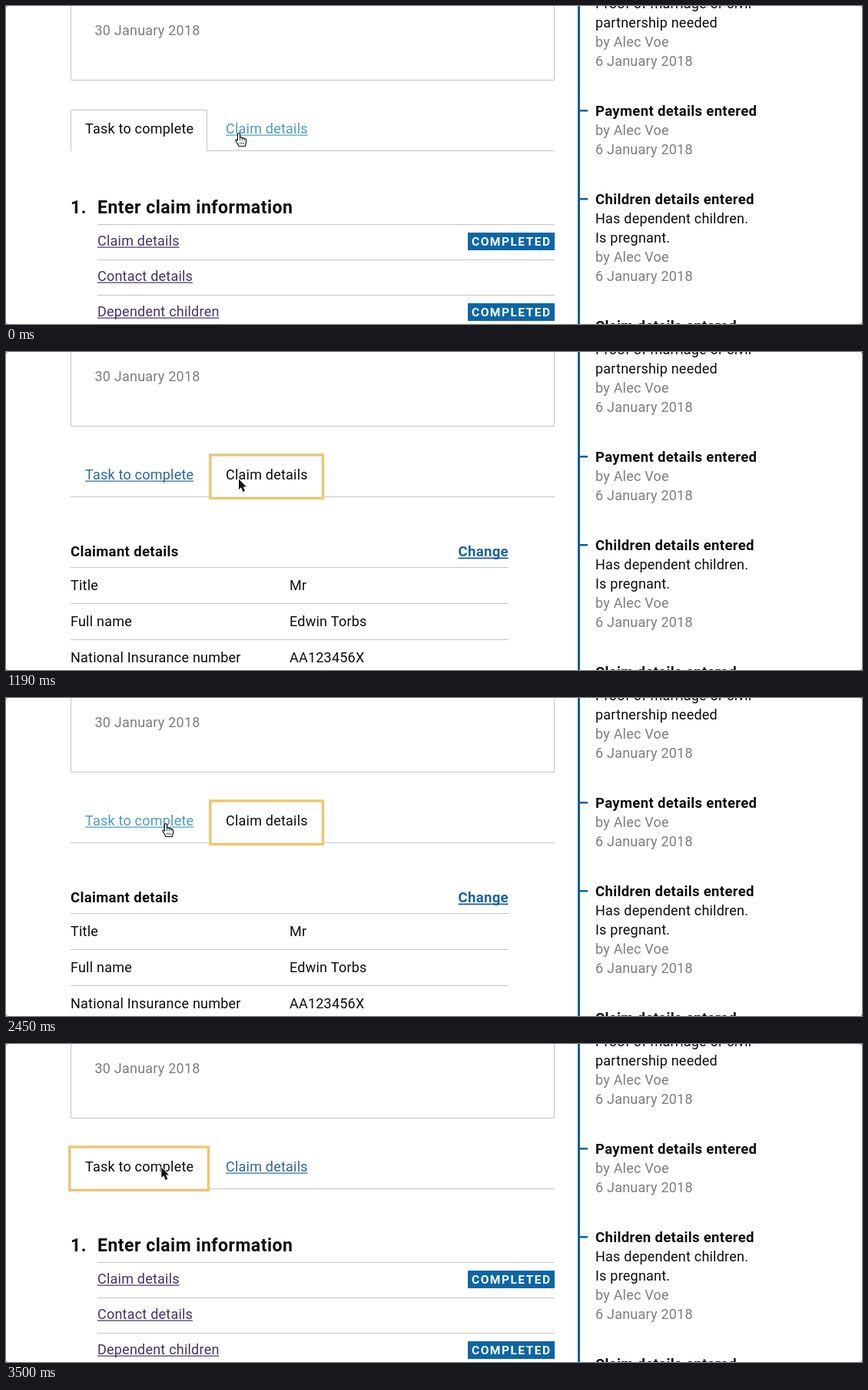
Recreate the animation shown at these times as an HTML page with a canvas. Size 1114 by 414 pixels, loop 3.57 s.

```html
<!DOCTYPE html>
<html lang="en">
<head>
<meta charset="utf-8">
<title>Claim tabs</title>
<style>
html, body { margin: 0; width: 100%; height: 100%; overflow: hidden; background: #fff; }
canvas { display: block; width: 1114px; height: 414px; }
</style>
</head>
<body>
<canvas id="stage"></canvas>
<script>
const W = 1114, H = 414, LOOP = 3570, STEP = 70;
const canvas = document.getElementById('stage');
const ctx = canvas.getContext('2d');
const dpr = window.devicePixelRatio || 1;
canvas.width = W * dpr;
canvas.height = H * dpr;

const INK = '#0b0c0c', GREY = '#7c7d7e', RULE = '#c4c5c6', FOCUS = '#ecc672';
const BLUE = '#0c66a6', LINK = '#2a6695', HOVER = '#4b9ac4', VISITED = '#44316b';

const STYLES = {
  body: ['400 18px', 0.22],
  bold: ['700 18.5px', 0.35],
  head: ['700 23px', 0.5],
  tag: ['700 15.5px', 1.5]
};

function text(str, x, y, color = INK, style = 'body') {
  const [font, spacing] = STYLES[style];
  ctx.font = font + ' Roboto, sans-serif';
  ctx.letterSpacing = spacing + 'px';
  ctx.fillStyle = color;
  ctx.fillText(str, x, y);
  return ctx.measureText(str).width - spacing;
}

function link(str, x, y, color, style) {
  const w = text(str, x, y, color, style);
  ctx.fillRect(x, y + 1.5, w, style === 'bold' ? 1.8 : 1.2);
}

function rule(x1, x2, y) {
  ctx.fillStyle = RULE;
  ctx.fillRect(x1, y, x2 - x1, 1);
}

function outline(points, color, width) {
  ctx.beginPath();
  points.forEach(([x, y]) => ctx.lineTo(x, y));
  ctx.strokeStyle = color;
  ctx.lineWidth = width;
  ctx.stroke();
}

function drawSummary() {
  outline([[84.5, -2], [84.5, 96.5], [713.5, 96.5], [713.5, -2]], RULE, 1);
  text('30 January 2018', 115.5, 38, GREY);
}

function drawTimeline() {
  ctx.fillStyle = '#0d5f99';
  ctx.fillRect(744, 0, 3, H);
  for (const y of [135, 250]) ctx.fillRect(747, y, 10, 2.5);

  const x = 767;
  const stamp = y => {
    text('by Alec Voe', x, y, GREY);
    text('6 January 2018', x, y + 25, GREY);
  };
  text('Proof of marriage or civil', x, 3);
  text('partnership needed', x, 28);
  stamp(53);
  text('Payment details entered', x, 143, INK, 'bold');
  stamp(168);
  text('Children details entered', x, 258, INK, 'bold');
  text('Has dependent children.', x, 283);
  text('Is pregnant.', x, 308);
  stamp(333);
  text('Claim details entered', x, 423, INK, 'bold');
}

const TABS = [
  { label: 'Task to complete', x: 103, left: 84.5, right: 261.5 },
  { label: 'Claim details', x: 286, left: 267.5, right: 410.5 }
];

function drawTabs({ selected, focused, hovered }) {
  const open = TABS[selected];
  rule(84, open.left, 188);
  rule(open.right, 714, 188);
  if (selected !== focused) {
    const { left, right } = open;
    outline([[left, 189], [left, 135.5], [right, 135.5], [right, 189]], RULE, 1);
  }
  TABS.forEach((tab, i) => {
    if (i === focused) {
      const inset = i === selected ? 0 : 5.5;
      ctx.strokeStyle = FOCUS;
      ctx.lineWidth = 3.4;
      ctx.strokeRect(tab.left - 1.7, 134 + inset, tab.right - tab.left + 3.6, 56.3 - 2 * inset);
    }
    if (i === selected) text(tab.label, tab.x, 166);
    else link(tab.label, tab.x, 166, i === hovered ? HOVER : LINK);
  });
}

function drawTasks() {
  text('1.', 84, 270, INK, 'head');
  text('Enter claim information', 119, 270, INK, 'head');
  ['Claim details', 'Contact details', 'Dependent children'].forEach((name, i) => {
    const y = 284 + 46 * i;
    rule(119, 714, y);
    link(name, 119, y + 28, VISITED);
    if (i === 1) return;
    ctx.fillStyle = BLUE;
    ctx.fillRect(601, y + 11, 113, 23);
    text('COMPLETED', 606, y + 28, '#fff', 'tag');
  });
}

function drawClaim() {
  text('Claimant details', 84, 266, INK, 'bold');
  link('Change', 588.5, 266, '#15629a', 'bold');
  const rows = [
    ['Title', 'Mr'],
    ['Full name', 'Edwin Torbs'],
    ['National Insurance number', 'AA123456X']
  ];
  rows.forEach(([name, value], i) => {
    const y = 280 + 47 * i;
    rule(84, 654, y);
    text(name, 84, y + 30);
    text(value, 369, y + 30);
  });
}

const ARROW = new Path2D('M0 0V13.5L3 10.8 5.3 16.4 8 15.2 5.7 9.9H9.8Z');
const HAND = new Path2D('M-1.6 1.4C-1.6-.4 1.4-.4 1.5 1.4V6C1.8 4.9 4.2 5 4.3 6.6 5 5.6 7 5.9 7 7.5 ' +
  '8 6.7 9.5 7.2 9.5 8.6V12C9.5 14 8.3 15 8.3 17H-.1C-.3 15-2 13.6-3.6 11 ' +
  '-5.2 8.6-3.2 7.7-1.6 9.6Z');
const FINGERS = new Path2D('M1.5 6V9.5M4.3 6.6V9.8M7 7.5V10M1.7 12V14.6M4 12V14.6M6.2 12V14.6');

function drawPointer({ x, y, hand }) {
  ctx.save();
  ctx.translate(x, y);
  ctx.lineJoin = 'round';
  ctx.lineWidth = hand ? 1.2 : 1.6;
  ctx.strokeStyle = hand ? '#111' : '#fff';
  ctx.fillStyle = hand ? '#fff' : '#111';
  if (hand) {
    ctx.fill(HAND);
    ctx.stroke(HAND);
    ctx.lineWidth = 0.8;
    ctx.stroke(FINGERS);
  } else {
    ctx.stroke(ARROW);
    ctx.fill(ARROW);
  }
  ctx.restore();
}

function drawPress(x, y) {
  ctx.beginPath();
  ctx.arc(x, y, 30.5, 0, Math.PI * 2);
  ctx.strokeStyle = '#111';
  ctx.lineWidth = 1.4;
  ctx.stroke();
}

function drawCorners() {
  const r = 3;
  ctx.beginPath();
  ctx.rect(0, 0, W, H);
  ctx.roundRect(0, 0, W, H, r);
  ctx.fillStyle = '#777';
  ctx.fill('evenodd');
}

const mix = (a, b, k) => a + (b - a) * k;
const ease = (t, start, end) => {
  const k = Math.min(1, Math.max(0, (t - start) / (end - start)));
  return k * k * (3 - 2 * k);
};

const PRESS_1 = 1050, OPEN_CLAIM = 1190, PRESS_2 = 3220, OPEN_TASKS = 3360;

function stateAt(t) {
  const across = ease(t, 1960, 2380);
  const settle = ease(t, 2800, 3080);
  const x = mix(303, 208, across) - 5.7 * settle;
  const y = mix(165.5, 163.5, across) - 1.5 * settle;
  const selected = t >= OPEN_CLAIM && t < OPEN_TASKS ? 1 : 0;
  const focused = t < PRESS_1 ? -1 : t < PRESS_2 ? 1 : 0;
  const over = x < 243 ? 0 : x > 286 ? 1 : -1;
  const hand = over >= 0 && over !== selected;
  const pressed = (t >= PRESS_1 && t < OPEN_CLAIM) || (t >= PRESS_2 && t < OPEN_TASKS);
  return { x, y: t >= OPEN_TASKS ? 160.5 : y, selected, focused, hand, pressed,
    hovered: hand && !pressed ? over : -1 };
}

function draw(t) {
  const state = stateAt(t);
  ctx.setTransform(dpr, 0, 0, dpr, 0, 0);
  ctx.fillStyle = '#fff';
  ctx.fillRect(0, 0, W, H);
  drawSummary();
  drawTimeline();
  drawTabs(state);
  if (state.selected === 0) drawTasks();
  else drawClaim();
  if (state.pressed) drawPress(state.x, state.y);
  drawPointer(state);
  drawCorners();
}

const start = performance.now();
function tick() {
  const t = (performance.now() - start) % LOOP;
  draw(Math.floor(t / STEP) * STEP);
  requestAnimationFrame(tick);
}
tick();
</script>
</body>
</html>
```
